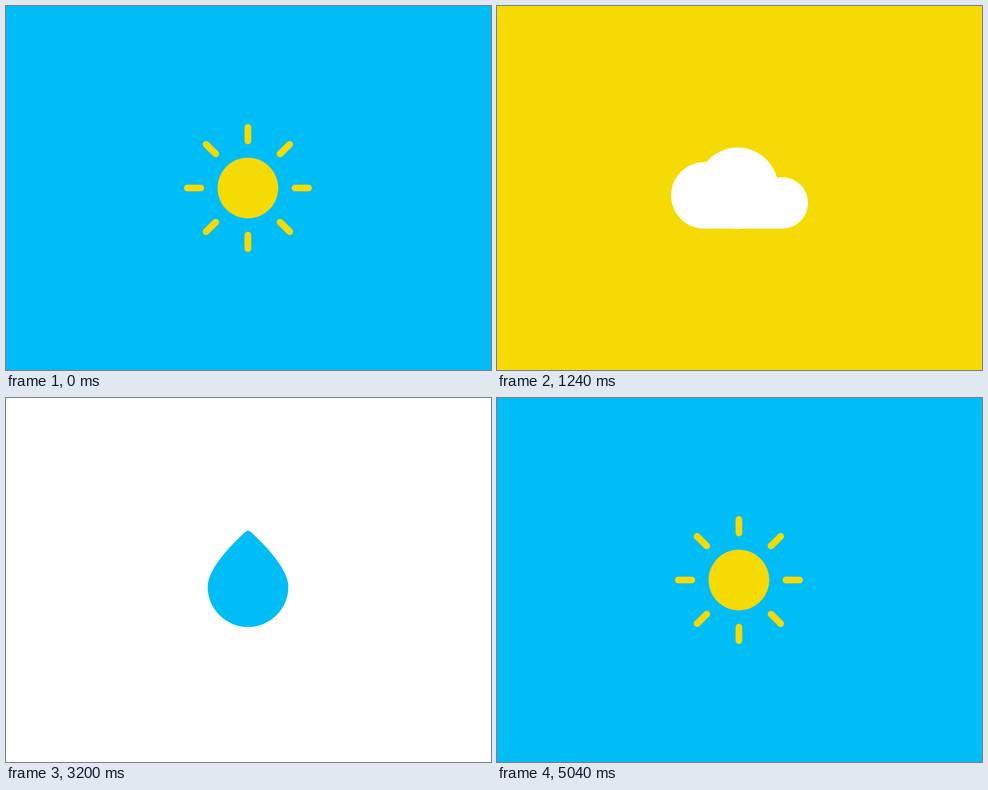
An HTML page that plays this animation: 800 px wide and 600 px high, repeating every 5.52 s.

```html
<!DOCTYPE html>
<html lang="en">
<head>
<meta charset="utf-8">
<title>Weather icons</title>
<style>
  html, body { margin: 0; width: 100%; height: 100%; overflow: hidden; }
  svg { display: block; width: 100vw; height: 100vh; }
  #sun { fill: #f5da03; stroke: #f5da03; }
  #sun circle { stroke: none; }
  #sun path { fill: none; stroke-width: 11; stroke-linecap: round; }
  #cloud { fill: #fff; }
  #drop { fill: #00bdf6; }
</style>
</head>
<body>
<svg id="stage" viewBox="0 0 800 600">
  <rect id="sky" width="800" height="600"/>
  <g id="sun">
    <circle r="50"/>
    <path d="M0-100V-77.6M0 100V77.6M-100 0H-77.6M100 0H77.6
             M69-72L53-56.2M69 72L53 56.2M-69-72L-53-56.2M-69 72L-53 56.2"/>
  </g>
  <g id="cloud">
    <circle cx="-58.1" cy="12.2" r="54.6"/>
    <circle cx="-3" cy=".4" r="67"/>
    <circle cx="70.5" cy="24.5" r="42.3"/>
    <rect x="-58.1" y="24" width="128.6" height="42.8"/>
  </g>
  <g id="drop">
    <path d="M-4.5-77.5Q0-81.5 4.5-77.5C30-54 66.5-16 66.5 13
             A66.5 66.2 0 0 1-66.5 13C-66.5-16-30-54-4.5-77.5Z"/>
  </g>
</svg>
<script>
const PHASE = 1840, SETTLE = 1360, ZOOM = 10;
const DAMPING = 4.2, FREQ = 6.95;

const stage = document.getElementById('stage');
const sky = document.getElementById('sky');
const icons = [
  { id: 'sun', x: 399, y: 300, color: '#f5da03' },
  { id: 'cloud', x: 400, y: 300, color: '#fff' },
  { id: 'drop', x: 399.2, y: 298.3, color: '#00bdf6' }
];
for (const icon of icons) icon.el = document.getElementById(icon.id);

// Damped spring from 0 to 1, starting at rest.
function spring(ms) {
  if (ms >= SETTLE) return 1;
  const t = ms / 1000, a = FREQ * t;
  return 1 - Math.exp(-DAMPING * t) * (Math.cos(a) + DAMPING / FREQ * Math.sin(a));
}

function place({ el, x, y }, scale) {
  el.setAttribute('transform', `translate(${x} ${y}) scale(${scale})`);
}

let shown = -1;

// The old icon swells until it becomes the sky behind the new one.
function draw(time) {
  const t = time % (PHASE * 3);
  const phase = Math.floor(t / PHASE);
  const [back, old, next] = [2, 0, 1].map(i => icons[(phase + i) % 3]);
  if (phase !== shown) {
    shown = phase;
    sky.setAttribute('fill', back.color);
    stage.append(old.el, next.el);
  }
  const s = spring(t - phase * PHASE);
  place(back, 0);
  place(old, 1 + ZOOM * s);
  place(next, s);
}

const start = performance.now();
function tick() {
  draw(performance.now() - start);
  requestAnimationFrame(tick);
}
tick();
</script>
</body>
</html>
```
